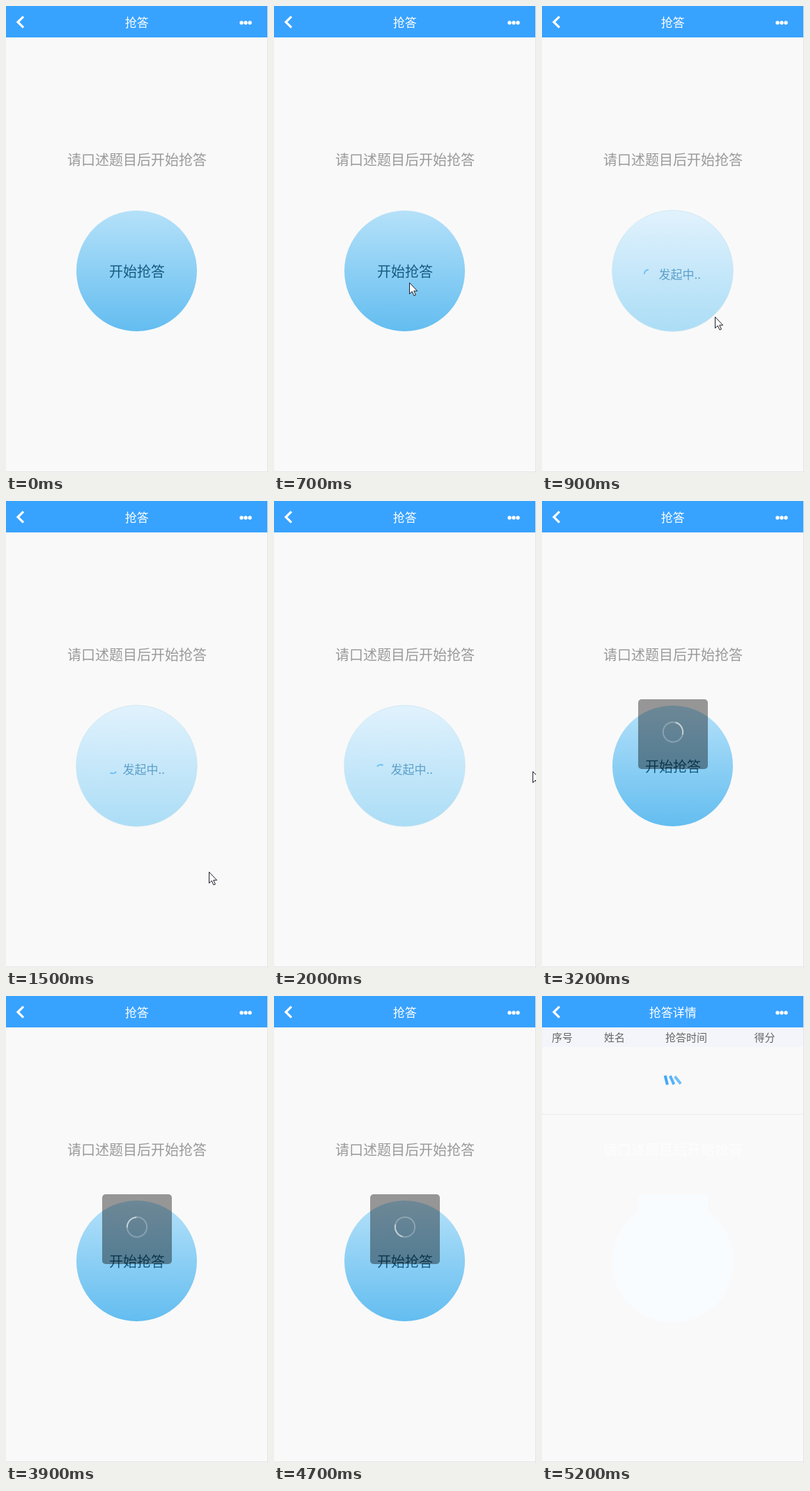
These frames come from a looping animation (376x669 px, 5.3 s). An HTML page:

```html
<!DOCTYPE html>
<html lang="zh-CN">
<head>
<meta charset="utf-8">
<title>抢答</title>
<style>
  html, body { margin: 0; width: 100%; height: 100%; overflow: hidden; background: #f9f9f9; }
  svg { display: block; width: 376px; height: 669px; }
  text { font-family: "Noto Sans CJK SC", "Noto Sans CJK", "Noto Sans", sans-serif; font-weight: 300; }
  .mid { text-anchor: middle; }
  .title { font-size: 17px; fill: #fff; }
  .big { font-size: 20px; }
  .cols { font-size: 15px; fill: #666; }
</style>
</head>
<body>
<svg viewBox="0 0 376 669">
  <defs>
    <linearGradient id="ready" x2="0" y2="1">
      <stop offset="0" stop-color="#b5e1f9"/><stop offset="1" stop-color="#63bdf0"/>
    </linearGradient>
    <linearGradient id="busy" x2="0" y2="1">
      <stop offset="0" stop-color="#e1f2fd"/><stop offset="1" stop-color="#abddf6"/>
    </linearGradient>
  </defs>

  <rect width="376" height="669" fill="#f9f9f9"/>

  <g id="ask">
    <text class="mid big" x="188" y="227.5" fill="#999">请口述题目后开始抢答</text>
    <g id="start">
      <circle cx="187.5" cy="379.5" r="86.5" fill="url(#ready)"/>
      <text class="mid big" x="188" y="388" fill="#155a80">开始抢答</text>
    </g>
    <g id="pending">
      <circle cx="187.5" cy="379.5" r="86.7" fill="url(#busy)" stroke="#c3e2f0" stroke-width=".7"/>
      <path id="arc" d="M-4.4-4.4A6.2 6.2 0 0 1 4.4-4.4" fill="none" stroke="#6fc0f4" stroke-width="2"/>
      <text x="167.5" y="391.3" font-size="17" fill="#5b9fc8">发起中..</text>
    </g>
    <g id="modal">
      <rect x="138" y="284" width="100" height="100" rx="5" fill="#000" fill-opacity=".4"/>
      <g id="ring" fill="none" stroke="#fff" stroke-width="2">
        <circle r="14.2" stroke-opacity=".25"/>
        <path d="M-10-10A14.2 14.2 0 0 1 10-10" stroke-opacity=".5"/>
      </g>
    </g>
  </g>

  <g id="detail">
    <g fill="#f8fcff">
      <circle cx="187.5" cy="380.5" r="87.5"/>
      <rect x="138" y="284" width="100" height="60"/>
      <text class="mid big" x="188" y="227.5" fill="#fdfdfd">请口述题目后开始抢答</text>
    </g>
    <rect y="45" width="375" height="28" fill="#f3f5fa"/>
    <g class="cols">
      <text x="14" y="65">序号</text>
      <text x="89" y="65">姓名</text>
      <text x="177" y="65">抢答时间</text>
      <text x="304.5" y="65">得分</text>
    </g>
    <rect y="169" width="375" height="1" fill="#ebebeb"/>
    <g id="bars"></g>
  </g>

  <rect width="375" height="45" fill="#38a2ff"/>
  <path d="M25 15.2L17 23L25 30.8" fill="none" stroke="#fff" stroke-width="3.2"/>
  <g fill="#fff">
    <circle cx="338" cy="24" r="2.7"/><circle cx="344" cy="24" r="2.7"/><circle cx="350" cy="24" r="2.7"/>
  </g>
  <text id="title" class="mid title" x="187.7" y="30.3">抢答</text>
  <rect x="375" width="1" height="669" fill="#e5e5e5"/>
  <rect y="667" width="376" height="1" fill="#e0e0e0"/>

  <path id="cursor" d="M.5.5V16.5L4.2 13L7 19L9.4 18L6.7 12.2H11.6Z" fill="#fff" stroke="#1c1c28" stroke-linejoin="round"/>
</svg>
<script>
const LOOP = 5300, STEP = 100;
const CLICK = 800, WAIT = 2900, DETAIL = 4800;

// time, x, y of the pointer tip
const path = [
  [100, 338, 214], [200, 304, 350], [300, 270, 445], [400, 231, 523],
  [500, 215, 480], [600, 192, 405], [700, 194, 396], [800, 210, 405],
  [900, 248, 445], [1000, 269, 500], [1100, 282, 528], [1200, 284, 529],
  [1500, 291, 531], [1800, 290, 530], [1900, 310, 497], [2000, 371, 387],
  [2100, 373, 342]
];

const el = id => document.getElementById(id);
const show = (id, on) => { el(id).style.display = on ? "" : "none"; };
const place = (node, x, y, turn = 0) =>
  node.setAttribute("transform", `translate(${x} ${y}) rotate(${turn})`);

const bars = ["#42a8f8", "#55b1f9", "#70bffa"].map(fill => {
  const bar = document.createElementNS("http://www.w3.org/2000/svg", "rect");
  const attrs = { x: -2, y: -6.7, width: 4, height: 13.4, fill };
  for (const key in attrs) bar.setAttribute(key, attrs[key]);
  return el("bars").appendChild(bar);
});

function pointer(t) {
  const i = path.findIndex(p => p[0] >= t);
  if (t < path[0][0] || i < 0) return null;
  const b = path[i], a = path[Math.max(0, i - 1)];
  const k = b === a ? 0 : (t - a[0]) / (b[0] - a[0]);
  return [a[1] + (b[1] - a[1]) * k, a[2] + (b[2] - a[2]) * k];
}

function draw(t) {
  const pending = t >= CLICK && t < WAIT;
  const detail = t >= DETAIL;
  show("ask", !detail);
  show("start", !pending);
  show("pending", pending);
  show("modal", t >= WAIT);
  show("detail", detail);
  el("title").textContent = detail ? "抢答详情" : "抢答";

  place(el("arc"), 153, 384, t * 0.36 - 10);
  place(el("ring"), 188, 331, t * 0.36 - 12);

  const lean = (5200 - t) * 0.18;
  bars.forEach((bar, i) => place(bar, 178.3 + 8.3 * i, 120.5, lean - [14, 24, 39][i]));

  const tip = pointer(t);
  show("cursor", tip);
  if (tip) place(el("cursor"), ...tip);
}

const begin = performance.now();
function tick() {
  const t = (performance.now() - begin) % LOOP;
  draw(Math.floor(t / STEP) * STEP);
  requestAnimationFrame(tick);
}
tick();
</script>
</body>
</html>
```
